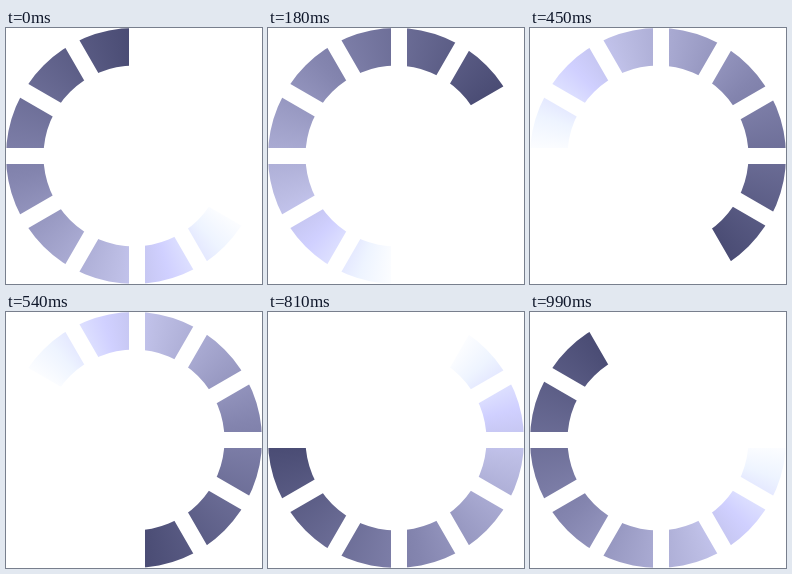
An HTML page with a canvas for the animation above (1.08 s loop, 256 by 256 pixels).

```html
<!DOCTYPE html>
<html lang="en">
<head>
<meta charset="utf-8">
<title>Loading ring</title>
<style>
html, body { margin: 0; height: 100%; overflow: hidden; background: #fff; }
canvas { display: block; width: 100vw; height: 100vh; }
</style>
</head>
<body>
<canvas id="ring" width="256" height="256"></canvas>
<script>
const ctx = document.getElementById('ring').getContext('2d');
const STEPS = 12, STEP_MS = 90, TURN = Math.PI * 2;
const HUB_X = 131, HUB_Y = 128; // the spokes cross slightly right of the ring's centre

// colour by degrees behind the leading edge
const TRAIL = [[0, '#484a72'], [100, '#8485af'], [170, '#bcbde4'], [195, '#d0d0ff'], [222, '#eef4ff'], [240, '#ffffff']];

function draw(step) {
  ctx.fillStyle = '#fff';
  ctx.fillRect(0, 0, 256, 256);

  const fade = ctx.createConicGradient(step / STEPS * TURN - TURN / 4, HUB_X, HUB_Y);
  for (const [deg, color] of TRAIL) fade.addColorStop(1 - deg / 360, color);
  ctx.fillStyle = fade;
  ctx.beginPath();
  ctx.arc(128, 128, 128, 0, TURN);
  ctx.arc(128, 128, 90.5, 0, TURN, true);
  ctx.fill();

  ctx.strokeStyle = '#fff';
  ctx.lineWidth = 16;
  ctx.beginPath();
  for (let i = 0; i < STEPS / 2; i++) {
    const a = i / STEPS * TURN, x = 150 * Math.cos(a), y = 150 * Math.sin(a);
    ctx.moveTo(HUB_X - x, HUB_Y - y);
    ctx.lineTo(HUB_X + x, HUB_Y + y);
  }
  ctx.stroke();
}

const start = performance.now();
function tick() {
  draw(Math.floor((performance.now() - start) / STEP_MS) % STEPS);
  requestAnimationFrame(tick);
}
tick();
</script>
</body>
</html>
```
